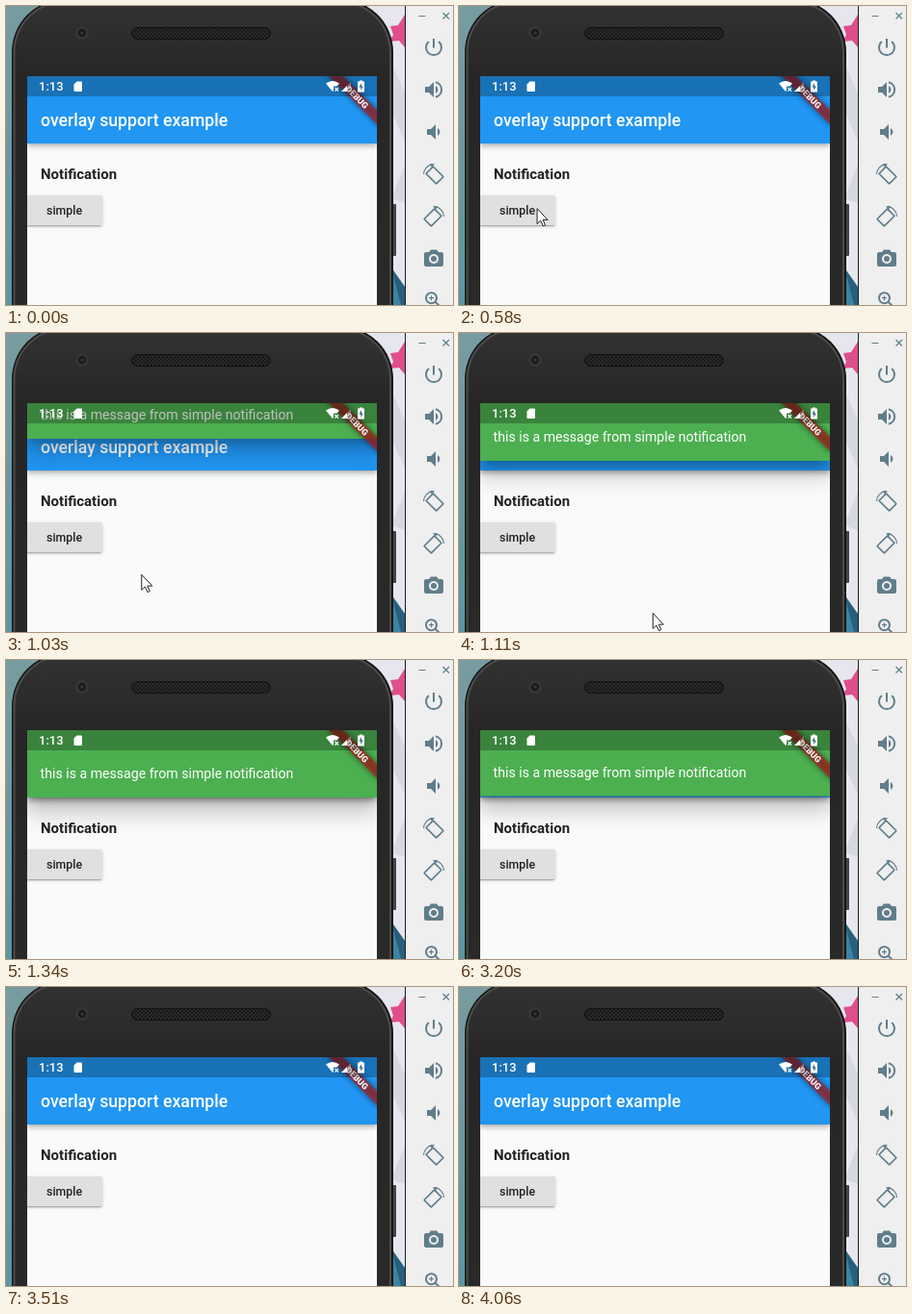
An HTML page that plays this animation: 464 by 311 pixels, repeating every 4.21 s.

```html
<!DOCTYPE html>
<html lang="en">
<head>
<meta charset="utf-8">
<title>Overlay notification</title>
<style>
html, body { margin: 0; width: 100%; height: 100%; overflow: hidden; background: #efefef; }
svg { display: block; width: 464px; height: 311px; font-family: Roboto, sans-serif; }
.medium { font-weight: 500; }
.bold { font-weight: 700; }
.icon { fill: #607d8b; }
.line { fill: none; stroke: #607d8b; stroke-width: 2; }
.thin { stroke-width: 1.2; }
foreignObject { overflow: visible; }
.sheet { width: 100%; height: 100%; }
.low { background: #e0e0e0; border-radius: 1.8px;
  box-shadow: 0 2.6px .9px -1.8px #0003, 0 1.8px 1.8px #00000024, 0 .9px 4.4px #0000001f; }
.mid { background: #2196f3;
  box-shadow: 0 1.8px 3.5px -.9px #0003, 0 3.5px 4.4px #00000024, 0 .9px 8.8px #0000001f; }
.high { background: #4caf50;
  box-shadow: 0 7px 8.8px -4.4px #0003, 0 14px 21px 1.8px #00000024, 0 5.3px 26px 4.4px #0000001f; }
</style>
</head>
<body>
<svg viewBox="0 0 464 311">
  <defs>
    <clipPath id="screen"><rect x="22" y="73" width="363" height="238"/></clipPath>
    <filter id="soft" x="-20%" y="-100%" width="140%" height="300%"><feGaussianBlur stdDeviation="3"/></filter>
    <linearGradient id="sea" x2="0" y2="1">
      <stop stop-color="#789ca0"/><stop offset="1" stop-color="#5a96a2"/>
    </linearGradient>
    <linearGradient id="body" x2="0" y2="1">
      <stop stop-color="#323232"/><stop offset=".2" stop-color="#262626"/><stop offset="1" stop-color="#2a2a2a"/>
    </linearGradient>
    <pattern id="mesh" width="4" height="4" patternUnits="userSpaceOnUse">
      <rect width="4" height="4" fill="#181818"/>
      <circle cx="1" cy="1" r=".9" fill="#333"/><circle cx="3" cy="3" r=".9" fill="#333"/>
    </pattern>
    <g id="turn">
      <rect class="line" x="-5.2" y="-7.500" width="10.400" height="15" rx=".5" transform="translate(1 1) rotate(-45)" style="stroke-width:1.700"/>
      <path class="line thin" d="M-10.500 0A10.500 10.500 0 0 1-1-10.300"/>
      <path class="icon" d="M-4-10.800H1L-2-7Z"/>
    </g>
  </defs>

  <!-- desktop -->
  <rect width="60" height="311" fill="url(#sea)"/>
  <rect x="360" width="55" height="311" fill="#e6e6ee"/>
  <path d="M414 9L407 20 399 21 402 30 398 37 408 36 414 43Z" fill="#df4f8c"/>
  <path d="M400 60L414 90V140L400 110ZM400 200L414 165V205Z" fill="#d5d8e1"/>
  <path d="M400 272L414 292V311H400Z" fill="#26607c"/>
  <path d="M400 272L410 311H400Z" fill="#3a84a4"/>

  <!-- phone -->
  <rect x="401" y="206" width="4" height="54" rx="1" fill="#444"/>
  <rect x="6" y="-7" width="396" height="400" rx="55" fill="#161616"/>
  <rect x="7.500" y="-5.500" width="392.500" height="400" rx="53.500" fill="#4c4c4c"/>
  <rect x="9.500" y="-3.500" width="388.500" height="400" rx="51.500" fill="url(#body)"/>
  <circle cx="79" cy="28" r="7" fill="#363636"/>
  <circle cx="79" cy="28" r="4.200" fill="#1c1c1c"/>
  <circle cx="79" cy="28" r="1.600" fill="#34383c"/>
  <rect x="130.500" y="22.500" width="144" height="12" rx="6" fill="url(#mesh)" stroke="#111"/>

  <g clip-path="url(#screen)">
    <rect x="22" y="73" width="363" height="238" fill="#f9fbfa"/>
    <text class="bold" x="36" y="180" font-size="15" fill="#212121">Notification</text>
    <foreignObject x="20" y="196.500" width="79.500" height="31.500"><div class="sheet low"></div></foreignObject>
    <text class="medium" x="42" y="216.500" font-size="12.360" fill="#212121">simple</text>

    <foreignObject x="22" y="73" width="363" height="70"><div class="sheet mid"></div></foreignObject>
    <text class="medium" x="36" y="125.400" font-size="17.660" fill="#fff">overlay support example</text>

    <g id="notice" visibility="hidden">
      <foreignObject x="22" y="73" width="363" height="70"><div class="sheet high"></div></foreignObject>
      <text x="35.600" y="123.200" font-size="14.130" fill="#fff">this is a message from simple notification</text>
    </g>

    <g transform="translate(385 73) rotate(45)">
      <rect x="-38" y="24.700" width="76" height="10.600" fill="#000" opacity=".5" filter="url(#soft)"/>
      <rect x="-38" y="24.700" width="76" height="10.600" fill="#b71c1c" opacity=".63"/>
      <text x="1" y="33.200" font-size="9" font-weight="900" text-anchor="middle" fill="#fff">DEBUG</text>
    </g>

    <!-- status bar -->
    <rect x="22" y="73" width="363" height="21" fill="#000" opacity=".25"/>
    <g fill="#fff">
      <text class="medium" x="34" y="88.300" font-size="13">1:13</text>
      <path d="M73.500 78.500H78Q79 78.500 79 79.500V88Q79 89 78 89H71.500Q70.500 89 70.500 88V81.500Z"/>
      <path d="M332 80.500Q339 75.500 346 80.500L343.500 83.500H340V88L339 89Z"/>
      <path d="M341.500 85l3.500 3.500m0-3.500l-3.500 3.500" stroke="#fff" stroke-width="1.100"/>
      <path d="M348 89L358 79V89Z" opacity=".3"/>
      <path d="M348 89L354 83V89Z"/>
      <path d="M367 78.500V77.500H370V78.500H372V89.500H365V78.500Z"/>
    </g>
    <path d="M369 80l-2.500 4.500h1.800V88l2.500-4.600H369Z" fill="#3c6480"/>
  </g>

  <!-- tool strip -->
  <rect x="414" width="50" height="311" fill="#efefef"/>
  <rect x="414" width="1" height="311" fill="#1c1c1c"/>
  <path class="line thin" d="M428.500 10.500H435.500M453.500 7l6.500 6.500m0-6.500l-6.500 6.500"/>
  <path class="line" d="M444 34V43.500M438.800 37A8 8 0 1 0 449.200 37"/>
  <path class="icon" d="M435 84h4l5-5v16l-5-5h-4ZM446 83q2.500 1.300 2.500 4t-2.500 4Z"/>
  <path class="line" d="M446 79.300a7.900 7.900 0 0 1 0 15.400"/>
  <path class="icon" d="M437 128h4l5-5v16l-5-5h-4ZM448 127q2.500 1.300 2.500 4t-2.500 4Z"/>
  <use href="#turn" x="444" y="175"/>
  <use href="#turn" transform="translate(444 219) scale(-1 1)"/>
  <path class="icon" fill-rule="evenodd" d="M441 253.500h6l2 2.500h3q2 0 2 2v11q0 2-2 2h-16q-2 0-2-2v-11q0-2 2-2h3ZM444 258a5 5 0 1 0 .01 0Z"/>
  <circle class="icon" cx="444" cy="263" r="3"/>
  <circle class="line" cx="441.500" cy="303.700" r="5.500"/>
  <path class="line" d="M445.500 307.700L451 313"/>
  <path class="line thin" d="M439 303.700h5m-2.500-2.500v5"/>

  <path id="cursor" visibility="hidden" d="M.5.500V16.500L4.200 13.200 6.800 18.800 9 17.800 6.500 12.300H11.500Z" fill="#fff" stroke="#222"/>
</svg>
<script>
const LOOP = 4210;
const TICKS = [0, 110, 190, 270, 340, 420, 500, 580, 660, 720, 880, 960, 1030, 1110,
  1180, 1260, 1340, 3200, 3280, 3360, 3430, 3510];
const notice = document.getElementById("notice");
const cursor = document.getElementById("cursor");

const span = (t, from, length) => Math.min(1, Math.max(0, (t - from) / length));

function place(el, x, y, shown) {
  el.setAttribute("transform", `translate(${x.toFixed(2)} ${y.toFixed(2)})`);
  el.setAttribute("visibility", shown ? "visible" : "hidden");
}

// Share of the panel that is slid out above the screen.
function hidden(t) {
  return t < 2000 ? (1 - span(t, 960, 315)) ** 3 : span(t, 3128, 267) ** 3;
}

// Glide in to the button, then speed away below the stage.
function pointer(t) {
  if (t < 840) {
    const left = (1 - span(t, 110, 610)) ** 1.5;
    return [62 + 169 * left, 199 + 101 * left];
  }
  const away = ((t - 840) / 120) ** 1.63;
  return [62 + 37 * away, 199 + 24.5 * away];
}

function draw() {
  const now = performance.now() % LOOP;
  const t = TICKS.findLast(tick => tick <= now);
  place(notice, 0, -70 * hidden(t), t >= 960 && t < 3510);
  place(cursor, ...pointer(t), t >= 110 && t < 1260);
  requestAnimationFrame(draw);
}
draw();
</script>
</body>
</html>
```
